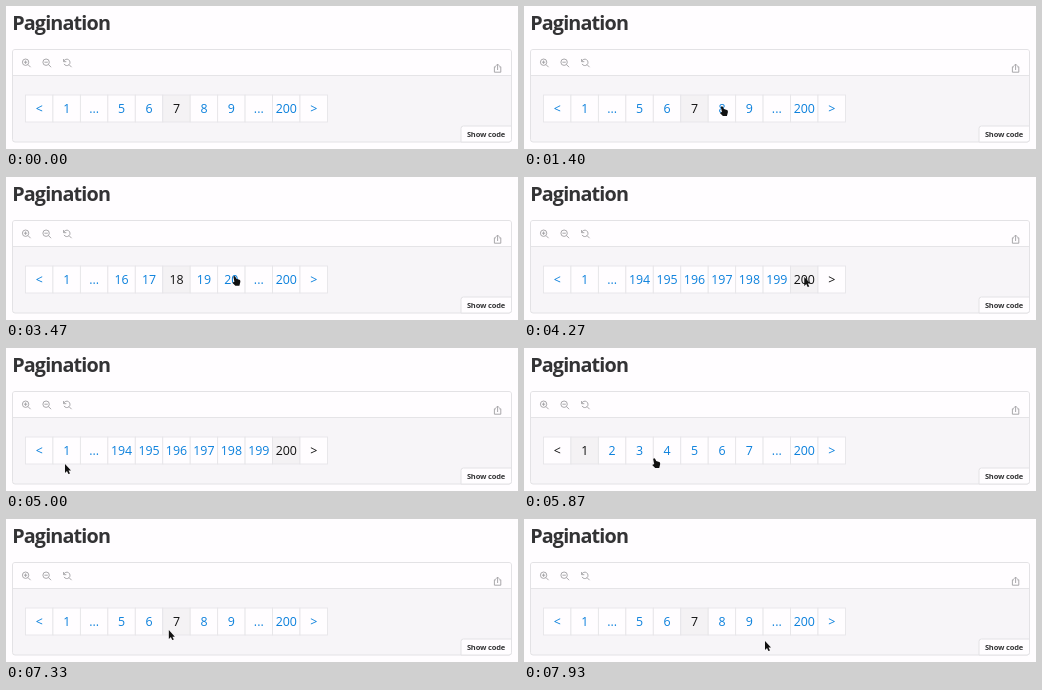
An HTML page that plays this animation: 512 by 143 pixels, repeating every 8000 ms.

```html
<!DOCTYPE html>
<html lang="en">
<head>
<meta charset="utf-8">
<title>Pagination</title>
<style>
  html, body { margin: 0; width: 100%; height: 100%; overflow: hidden; background: #fffdff; }
  svg { display: block; width: 512px; height: 143px; }
  text { font-family: "Open Sans", "Noto Sans", sans-serif; }
  .title { font-size: 19.8px; font-weight: 700; letter-spacing: -.85px; fill: #333335; }
  .icon { fill: none; stroke: #a09fa2; stroke-width: .9; }
  .label { font-size: 12.4px; text-anchor: middle; }
  .button { font-size: 7.5px; font-weight: 700; letter-spacing: -.15px; text-anchor: middle; fill: #333335; }
</style>
</head>
<body>
<svg viewBox="0 0 512 143">
  <rect width="512" height="143" fill="#fffdff"/>
  <text class="title" x="6.2" y="24.2">Pagination</text>

  <rect x="6.5" y="43.5" width="499" height="92.5" rx="2.5" fill="#f7f5f8" stroke="#e3e2e5"/>
  <path d="M7 69V46q0-2 2-2h494q2 0 2 2v23z" fill="#fffdff"/>
  <path d="M7 69.5H505" stroke="#e5e4e7"/>

  <g class="icon">
    <g id="lens">
      <circle cx="19.6" cy="56.2" r="3.2"/>
      <path d="M22 58.6l2.6 2.6M17.9 56.2h3.4"/>
    </g>
    <path d="M19.6 54.5v3.4"/>
    <use href="#lens" x="20.5"/>
    <path d="M57.6 53v2.7h2.7M57.8 55.3a3.2 3.2 0 1 1 .2 2.6M63 58.6l2.6 2.6"/>
    <path d="M490 60.8h-1.6v5.4h6.4v-5.4h-1.6M491.6 64v-5.7M489.9 59.8l1.7-1.7l1.7 1.7"/>
  </g>

  <path d="M455 136V122.5q0-2.5 2.5-2.5H505.5V133.5q0 2.5-2.5 2.5z" fill="#fffdff" stroke="#e3e2e5"/>
  <text class="button" x="480" y="130.8">Show code</text>

  <g id="bar"></g>

  <path id="arrow" d="M0 0V9L2 7L3.4 10L5 9.4L3.5 6.6H6z" fill="#111"/>
  <path id="hand" d="M-1 1Q0-.5 1 1L2 3L5 4Q6 4 6 6L5 10H1L-2 7L0 6z" fill="#111"/>
</svg>
<script>
const LOOP = 8000, STEP = 1000 / 15, LAST = 200;
const BAR = { x: 19.5, y: 89, cell: 27.45, height: 27, count: 11 };
const BLUE = "#0b80dc", BLACK = "#111";

const cellCenter = index => BAR.x + BAR.cell * (index + .5);

// The pointer rests after each move until the next one begins.
const moves = [
  { from: 400, to: 860, x: 38, y: 123 },
  { from: 860, to: 1270, x: cellCenter(6), y: 100 },
  { from: 1733, to: 2000, x: cellCenter(6) + 10, y: 100.5 },
  { from: 3267, to: 3467, x: cellCenter(7) + 3, y: 98.7 },
  { from: 3467, to: 4067, x: cellCenter(9), y: 100 },
  { from: 4267, to: 4733, x: 265, y: 124 },
  { from: 4733, to: 5000, x: 59, y: 116 },
  { from: 5000, to: 5200, x: 57, y: 100 },
  { from: 5400, to: 6200, x: 174, y: 116 },
  { from: 6200, to: 6600, x: cellCenter(7) + 6, y: 104 },
  { from: 6933, to: 7733, x: 95, y: 118 },
  { from: 7733, to: 7933, x: 241, y: 122 }
];
const entry = { x: 488, y: 137 };

function pageAt(time) {
  if (time < 1600) return 7;
  if (time < 3467) return 8 + Math.max(0, Math.ceil((time - 1866) / 200));
  if (time < 4200) return 18;
  if (time < 5400) return LAST;
  return time < 6933 ? 1 : 7;
}

function pointerAt(time) {
  if (time < moves[0].from) return null;
  return moves.reduce((at, { from, to, x, y }) => {
    const k = Math.min(1, Math.max(0, (time - from) / (to - from)));
    const ease = k * k * (3 - 2 * k);
    return { x: at.x + (x - at.x) * ease, y: at.y + (y - at.y) * ease };
  }, entry);
}

const svgNode = (tag, attrs, parent) => {
  const node = document.createElementNS("http://www.w3.org/2000/svg", tag);
  for (const key in attrs) node.setAttribute(key, attrs[key]);
  return parent.appendChild(node);
};

const bar = document.getElementById("bar");
const arrow = document.getElementById("arrow");
const hand = document.getElementById("hand");

const cells = Array.from({ length: BAR.count }, (_, i) => ({
  box: svgNode("rect", { x: BAR.x + i * BAR.cell, y: BAR.y, width: BAR.cell, height: BAR.height, stroke: "#e6e5e8", "stroke-width": .9 }, bar),
  text: svgNode("text", { class: "label", x: cellCenter(i), y: 107.4 }, bar)
}));

const range = (from, to) => Array.from({ length: to - from + 1 }, (_, i) => from + i);

function itemsFor(page) {
  const pages = page < 5 ? [...range(1, 7), "...", LAST]
    : page > LAST - 4 ? [1, "...", ...range(LAST - 6, LAST)]
    : [1, "...", ...range(page - 2, page + 2), "...", LAST];
  return ["<", ...pages, ">"];
}

const isInactive = (item, page) =>
  item === page || (item === "<" && page === 1) || (item === ">" && page === LAST);

function isOverLink({ x, y }, items, page) {
  const index = Math.floor((x - BAR.x) / BAR.cell);
  const inside = y >= BAR.y && y < BAR.y + BAR.height - 1;
  return inside && index in items && !isInactive(items[index], page);
}

function place(shape, pointer, shown) {
  shape.setAttribute("visibility", shown ? "visible" : "hidden");
  if (shown) shape.setAttribute("transform", `translate(${pointer.x} ${pointer.y})`);
}

function render(time) {
  const now = Math.floor((time + 5) / STEP) * STEP + 1;
  const page = pageAt(now);
  const items = itemsFor(page);

  cells.forEach(({ box, text }, i) => {
    box.setAttribute("fill", items[i] === page ? "#f4f2f4" : "#fffdff");
    text.setAttribute("fill", isInactive(items[i], page) ? BLACK : BLUE);
    text.textContent = items[i];
  });

  const pointer = pointerAt(now);
  const overLink = pointer && isOverLink(pointer, items, page);
  place(hand, pointer, overLink);
  place(arrow, pointer, pointer && !overLink);
}

const start = performance.now();
function tick() {
  render((performance.now() - start) % LOOP);
  requestAnimationFrame(tick);
}
tick();
</script>
</body>
</html>
```
